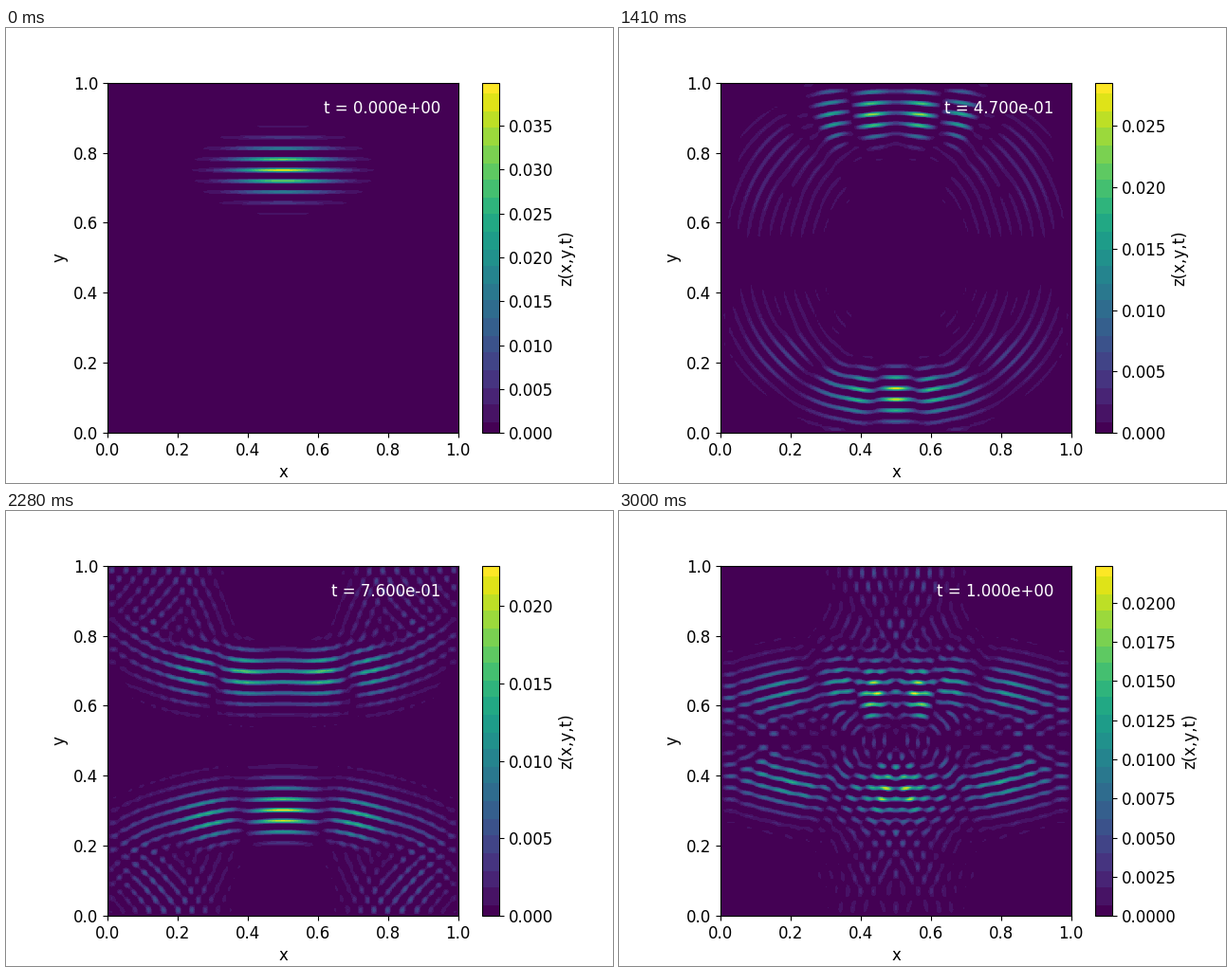
A matplotlib script that plays this animation: 640 px wide and 480 px high, repeating every 3.03 s.

```python
import numpy as np
import matplotlib.pyplot as plt
from matplotlib.animation import FuncAnimation
from matplotlib.colors import ListedColormap

FRAMES, SKIP = 101, 2
H, DT = 0.005, 2.5e-5
N = 200            # grid intervals per side
MID = N // 2
SLIT = (5, 20)     # slit edges, in grid steps from the centre
FONT = 12


def wave_packet():
    """Left half of a Gaussian packet heading down the box."""
    s = np.arange(1, N)[:, None] * H
    x = np.arange(1, MID + 1)[None, :] * H
    u = np.exp(-(x - 0.5) ** 2 / (2 * 0.1 ** 2)
               - (s - 0.25) ** 2 / (2 * 0.05 ** 2)
               + 200j * (s - 0.25))
    full = 2 * np.sum(np.abs(u) ** 2) - np.sum(np.abs(u[:, -1]) ** 2)
    return u / np.sqrt(full)


def barrier(row):
    """High potential of a double-slit wall across the middle rows."""
    off = MID - np.arange(1, MID + 1)
    solid = (off <= SLIT[0]) | (off >= SLIT[1])
    return np.where(solid & (abs(row - MID) <= 2), 1e10, 0.0)


def mirror(half):
    inner = np.hstack([half, half[:, -2::-1]])
    return np.pad(inner, 1)


def simulate():
    """Crank-Nicolson for i u_t = -laplace(u) + v u, by block elimination."""
    r = 1j * DT / (2 * H * H)
    couple = np.eye(MID, k=1) + np.eye(MID, k=-1)
    couple[-1, -2] = 2             # symmetry about the centre column
    base = (1 + 4 * r) * np.eye(MID) - r * couple

    inv = []
    for row in range(1, N):
        block = base + np.diag(0.5j * DT * barrier(row))
        if inv:
            block = block - r * r * inv[-1]
        inv.append(np.linalg.inv(block))

    u = wave_packet()
    out = [mirror(u.real)]
    for step in range(1, SKIP * (FRAMES - 1) + 1):
        w = 2 * u
        w[0] = inv[0] @ w[0]
        for j in range(1, N - 1):
            w[j] = inv[j] @ (w[j] + r * w[j - 1])
        for j in range(N - 3, -1, -1):
            w[j] += r * (inv[j] @ w[j + 1])
        u = w - u
        if step % SKIP == 0:
            out.append(mirror(u.real))
    return out


def banded_viridis():
    edges = 0.03 + 0.0495 * np.arange(20)
    band = np.searchsorted(edges, np.linspace(0, 1, 256))
    return ListedColormap(plt.get_cmap("viridis")(band / len(edges)))


waves = simulate()

fig, ax = plt.subplots(figsize=(6.4, 4.8), dpi=100)
img = ax.imshow(waves[0], extent=[0, 1, 0, 1], cmap=banded_viridis(),
                vmin=0, vmax=waves[0].max())
ax.set_xlabel("x", fontsize=FONT)
ax.set_ylabel("y", fontsize=FONT)
ax.tick_params(labelsize=FONT)

cbar = fig.colorbar(img, ax=ax)
cbar.set_label("z(x,y,t)", fontsize=FONT)
cbar.ax.tick_params(labelsize=FONT)

clock = ax.text(0.95, 0.95, "", color="white", ha="right", va="top",
                fontsize=FONT)


def update(i):
    img.set_data(waves[i])
    img.set_clim(0, waves[i].max())
    clock.set_text(f"t = {i * 0.01:.3e}")
    return img, clock


anim = FuncAnimation(fig, update, frames=FRAMES, interval=30, repeat=True,
                     repeat_delay=0, blit=False)
plt.show()
```
